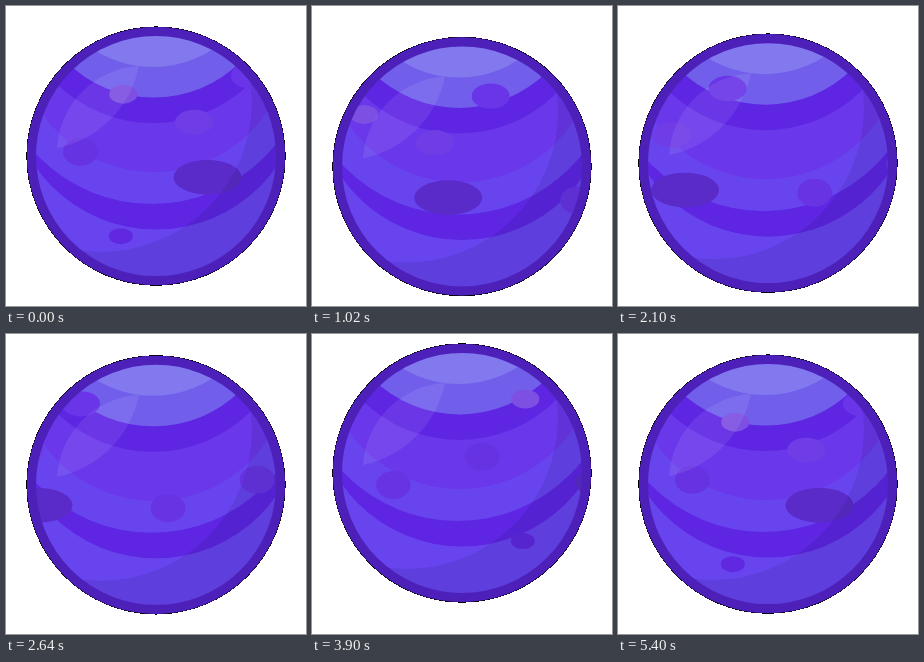
Animation of 300x300 px, one loop 5430 ms. Source, as an HTML page:

```html
<!DOCTYPE html>
<html lang="en">
<head>
<meta charset="utf-8">
<title>Rotating planet</title>
<style>
html, body { margin: 0; width: 100%; height: 100%; overflow: hidden; background: #fff; }
svg { display: block; width: 100%; height: 100%; }
</style>
</head>
<body>
<svg viewBox="0 0 300 300">
  <clipPath id="disc"><circle r="121"/></clipPath>
  <g id="planet">
    <circle r="129.7" fill="#000" shape-rendering="crispEdges"/>
    <circle r="129.1" fill="#4e20ba"/>
    <g clip-path="url(#disc)">
      <circle r="121" fill="#6844ee"/>
      <g id="bands"></g>
      <g id="spots"></g>
      <path d="M-99-8A87 87 0 0 1-17-90A105 105 0 0 1-99-8Z" fill="#fff" fill-opacity=".08"/>
      <path d="M-200-200H200V200H-200ZM-206-55a151 151 0 1 0 302 0a151 151 0 1 0-302 0Z"
        fill="#0f123a" fill-opacity=".1" fill-rule="evenodd"/>
    </g>
    <circle r="124.4" fill="none" stroke="#4e20ba" stroke-width="8.8"/>
  </g>
</svg>
<script>
const FRAME = 30, LOOP = 5430, CYCLE = 5400;
const SPEED = 0.064, WRAP = SPEED * CYCLE, LEFT = -40;
const CENTER_Y = 150.1, BOB = 11.3, LEAD = 60;

// Each band is the part of the disc above an arc: centre x, lowest point, radius, colour
const bands = [
  [0, 73.5, 147, '#5e25e3'],
  [-4.3, 48, 158.7, '#6844ee'],
  [-2, 16, 136, '#6a37ea'],
  [-3, -33, 138, '#5e25e3'],
  [-2.5, -58.5, 124, '#715fec'],
  [-3, -89, 109, '#8279ef']
];
document.getElementById('bands').innerHTML = bands.map(([x, low, r, fill]) =>
  `<circle cx="${x}" cy="${low - r}" r="${r}" fill="${fill}"/>`).join('');

// Start x, y from the planet's centre, radii, colour
const spots = [
  [201.5, 20.5, 34, 17.3, '#5a2bc8'],
  [117.3, -62.7, 14, 9.5, '#7d4fe2'],
  [188.2, -34.6, 19.2, 12.5, '#6f3ce6'],
  [74.5, -5, 17.5, 14, '#6733e2'],
  [114.8, 79.3, 12, 8, '#6028e0'],
  [244, -81, 19, 12.7, '#6a35e8'],
  [331, 23.3, 17.3, 14, '#6733e3']
];
const spotGroup = document.getElementById('spots');
spotGroup.innerHTML = spots.map(([, y, rx, ry, fill]) =>
  `<ellipse cy="${y}" rx="${rx}" ry="${ry}" fill="${fill}"/>`).join('');

const mod = (a, n) => ((a % n) + n) % n;

// Eased swing between -1 and 1, starting upward from 0
function swing(t) {
  const p = mod(t / CYCLE + 0.25, 1) * 4;
  const x = p < 2 ? p - 1 : 3 - p;
  return 1.5 * x - 0.5 * x ** 3;
}

function draw(now) {
  const t = Math.floor((now % LOOP) / FRAME) * FRAME;
  const y = CENTER_Y + BOB * swing(t);
  document.getElementById('planet').setAttribute('transform', `translate(150 ${y})`);
  // The spots add a swing of their own, slightly ahead of the planet
  spotGroup.setAttribute('transform', `translate(0 ${BOB * swing(t + LEAD)})`);
  spots.forEach(([x], i) => {
    const cx = mod(x - SPEED * t - LEFT, WRAP) + LEFT;
    spotGroup.children[i].setAttribute('cx', cx - 150);
  });
}

const start = performance.now();
function tick() {
  draw(performance.now() - start);
  requestAnimationFrame(tick);
}
tick();
</script>
</body>
</html>
```
